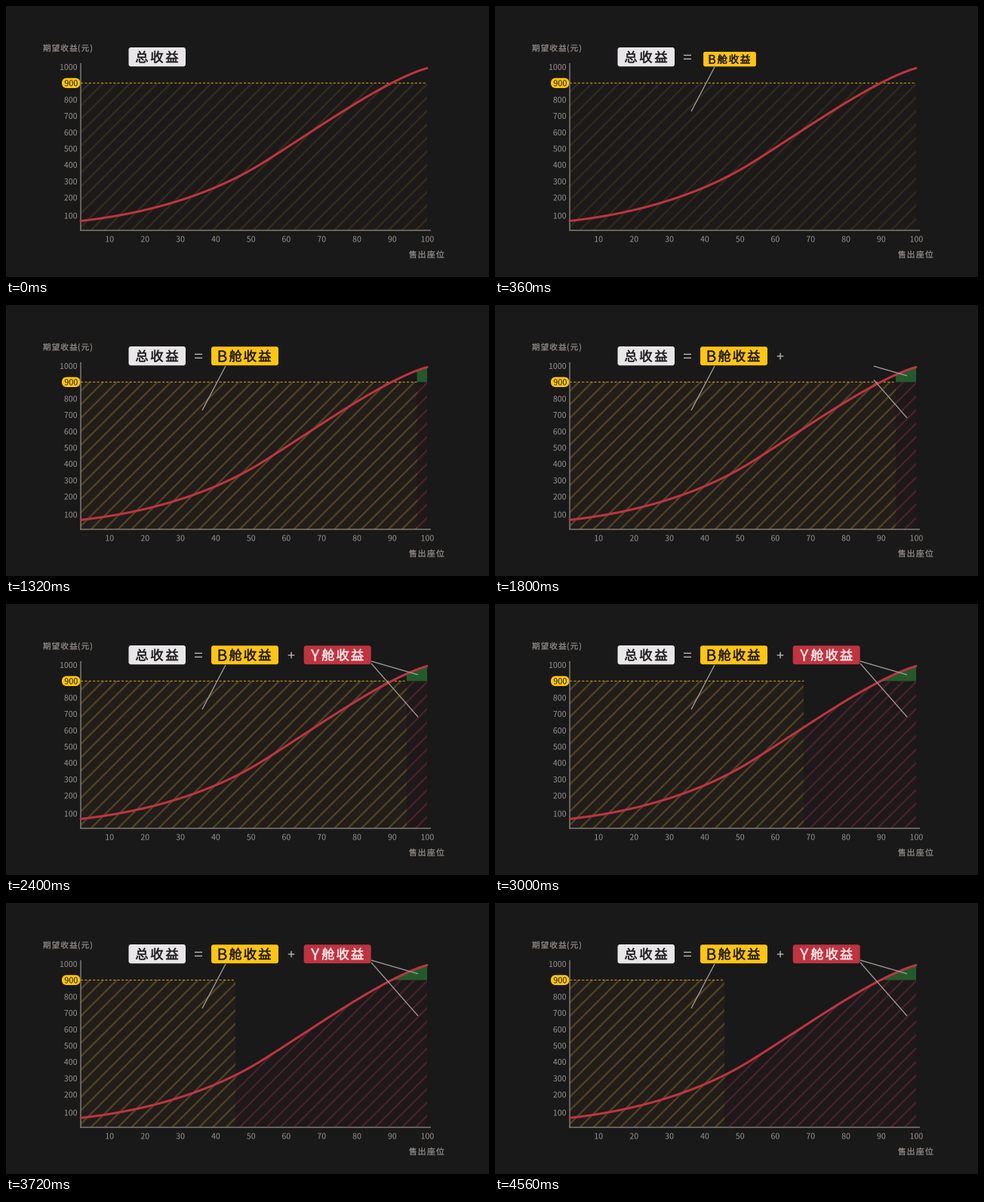
These frames come from a looping animation (640 by 360 pixels, 4.68 s). A matplotlib script:

```python
import numpy as np
import matplotlib.pyplot as plt
from matplotlib.animation import FuncAnimation
from matplotlib.collections import LineCollection
from matplotlib.patches import FancyBboxPatch, PathPatch, Polygon
from matplotlib.textpath import TextPath
from matplotlib.transforms import Affine2D

W, H, DPI = 640, 360, 100
FRAMES, STEP = 39, 120
PX = 72 / DPI

BG, INK, GREY = "#191919", "#1c1a1a", "#99928d"
YELLOW, RED, WHITE = "#ffc414", "#be3441", "#e8e6e8"
LEFT, RIGHT, CAP, BASE = 99, 558, 102.4, 297.5

fig = plt.figure(figsize=(W / DPI, H / DPI), dpi=DPI, facecolor=BG)
ax = fig.add_axes([0, 0, 1, 1])
ax.set(xlim=(0, W), ylim=(H, 0))
ax.axis("off")


def ramp(t, a, b):
    return float(np.clip((t - a) / (b - a), 0, 1))


def ease_out(u):
    return 1 - (1 - u) ** 3


def ease_both(u):
    return (1 - np.cos(np.pi * u)) / 2


def line(xs, ys, color, width, z=4, **kw):
    return ax.plot(xs, ys, color=color, lw=width * PX, zorder=z, snap=False,
                   **{"solid_capstyle": "butt", **kw})[0]


def text(s, x, y, size, color, bold=0, right=False, z=8):
    """Outline text centred on (x, y), or ending at x."""
    path = TextPath((0, 0), s, size=size, prop={"family": "Noto Sans CJK JP"})
    box = path.get_extents()
    dx = x - (box.x1 if right else (box.x0 + box.x1) / 2)
    place = Affine2D().scale(1, -1).translate(dx, y + 0.37 * size)
    shape = place.transform_path(path)
    shape.should_simplify = False
    return ax.add_patch(PathPatch(shape, fc=color, ec=color, lw=bold * PX,
                                  snap=False, zorder=z))


def spaced(s, x, y, pitch, size, color, bold=0):
    return [text(c, x + i * pitch, y, size, color, bold) for i, c in enumerate(s)]


def box(x0, y0, x1, y1, color, radius):
    style = f"round,pad=0,rounding_size={radius}"
    return ax.add_patch(FancyBboxPatch((x0, y0), x1 - x0, y1 - y0, boxstyle=style,
                                       fc=color, lw=0, snap=False, zorder=7))


def hatch(color):
    gap, height = 17.92, BASE - CAP
    starts = np.arange(-102, RIGHT + gap, gap)
    segs = [[(x, BASE), (x + height, CAP)] for x in starts]
    return ax.add_collection(LineCollection(segs, colors=color, linewidths=2.3 * PX,
                                            capstyle="projecting", zorder=2),
                             autolim=False)


def area(color):
    return ax.add_patch(Polygon([(0, 0)] * 3, fc=color, lw=0, snap=False, zorder=1))


def bezier(p, n=120):
    u = np.linspace(0, 1, n)[:, None]
    a, b, c, d = np.array(p, float)
    return (1 - u) ** 3 * a + 3 * u * (1 - u) ** 2 * b + 3 * u * u * (1 - u) * c + u ** 3 * d


# Revenue areas
fill_b, fill_y, extra = area("#211d1a"), area("#1d191a"), area("#245a2b")
hatch_b, hatch_y = hatch("#524320"), hatch("#4a2228")
cap = line([LEFT, RIGHT], [CAP, CAP], "#b98d17", 1.2, z=3, dashes=(2.6, 1.9))

# Axes and curve
line([LEFT, LEFT], [76, 298.5], "#87807b", 1.4)
line([LEFT - 0.7, 563], [298, 298], "#87807b", 1.4)
curve = np.vstack([
    bezier([(99, 285.5), (190, 275.5), (275, 249.5), (340, 208.5)]),
    bezier([(340, 208.5), (400, 171.5), (500, 99), (558, 82.5)])[1:],
])
line(*curve.T, RED, 3, z=5, solid_capstyle="round")

levels = [278.5, 254.5, 233, 211, 189.5, 168, 146, 124.5, None, 81]
for i, y in enumerate(levels, 1):
    if y:
        text(str(i * 100), 94, y, 10.6, GREY, right=True)
    text(str(i * 10), 137.4 + 46.8 * (i - 1), 309.5, 10.6, GREY)
box(74, 95.7, 98.3, 109, YELLOW, 6.6)
text("900", 86.3, 102.4, 10.8, INK)

spaced("期望收益", 54, 55.8, 11.8, 10.6, GREY, 0.2)
spaced("(元)", 97, 55.8, 7.9, 10.6, GREY, 0.2)
spaced("售出座位", 539, 330, 12.1, 11, GREY, 0.2)

# Formula
box(162.5, 55, 238, 80.3, WHITE, 3)
spaced("总收益", 180, 67.8, 20, 17.2, INK, 0.6)
SIGN, LEAD = "#c4beb9", "#a49c98"
equals = [line([250, 260], [y, y], SIGN, 1.3) for y in (65.4, 70.4)]
plus = [line([373.7, 382.3], [68, 68], SIGN, 1.3),
        line([378, 378], [63.7, 72.3], SIGN, 1.3)]


def cabin(letter, x, fill, ink):
    return [box(x, 55.3, x + 89, 80.2, fill, 3),
            text(letter, x + 15, 68, 20.6, ink, 0.4),
            *spaced("舱收益", x + 32.2, 67.8, 19.3, 17.2, ink, 0.6)]


label_b = cabin("B", 272, YELLOW, INK)
label_y = cabin("Y", 394.7, RED, "#f3e6e6")
leaders_b = [((260, 140), (291, 81))]
leaders_y = [((546, 94), (484, 76)), ((546, 150), (484, 79))]
lines_b = [line([], [], LEAD, 1.3, z=6) for _ in leaders_b]
lines_y = [line([], [], LEAD, 1.3, z=6) for _ in leaders_y]


def show(parts, on):
    for p in parts:
        p.set_visible(on)


def pop(parts, x, y, scale):
    show(parts, scale > 0)
    if scale > 0:
        move = Affine2D().translate(-x, -y).scale(scale).translate(x, y)
        for p in parts:
            p.set_transform(move + ax.transData)


def grow(lines, ends, u):
    for ln, ((x0, y0), (x1, y1)) in zip(lines, ends):
        ln.set_data([x0, x0 + (x1 - x0) * u], [y0, y0 + (y1 - y0) * u])
        ln.set_visible(u > 0)


def split(x):
    """Divide the chart into the two cabins at x."""
    fill_b.set_xy([(LEFT, CAP), (x, CAP), (x, BASE), (LEFT, BASE)])
    hatch_b.set_clip_path(fill_b)
    cap.set_data([LEFT, x], [CAP, CAP])
    show([fill_y, hatch_y, extra], x < RIGHT)
    xs = np.linspace(x, RIGHT, 200)
    ys = np.interp(xs, *curve.T)
    for part, edge, floor in ((fill_y, np.maximum(ys, CAP), BASE),
                              (extra, np.minimum(ys, CAP), CAP)):
        part.set_xy([*zip(xs, edge), (RIGHT, floor), (x, floor)])
    hatch_y.set_clip_path(fill_y)


def update(i):
    t = i * STEP
    glow = np.interp(t, [0, 360, 720], [0.45, 0.4, 1])
    fill_b.set_alpha(glow)
    hatch_b.set_alpha(glow)
    split(RIGHT - 27 * ease_both(ramp(t, 1080, 1560))
          - 227 * ease_both(ramp(t, 2375, 3570)))
    grow(lines_b, leaders_b, ramp(t, 0, 240))
    show(equals, t >= 240)
    pop(label_b, 291, 81, ease_out(ramp(t, 240, 540)))
    show(plus, t >= 1560)
    grow(lines_y, leaders_y, ramp(t, 1620, 1873))
    pop(label_y, 484, 78, ease_out(ramp(t, 1860, 2160)))
    return []


anim = FuncAnimation(fig, update, frames=FRAMES, interval=STEP, repeat=True,
                     repeat_delay=0, blit=False)
plt.show()
```
